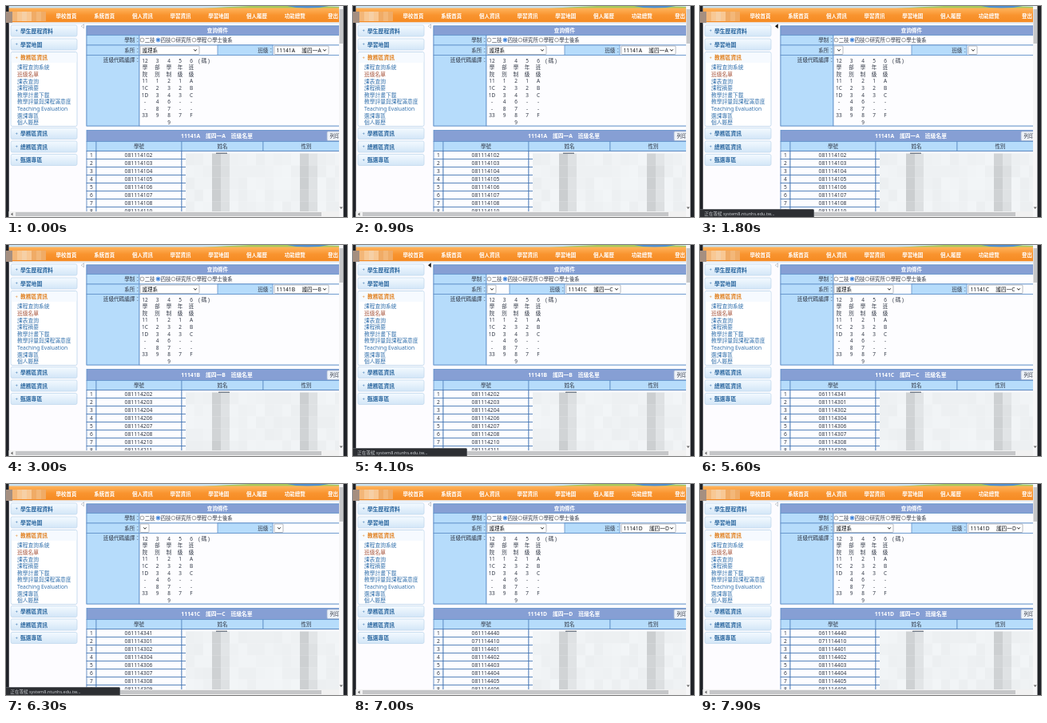
These frames come from a looping animation (427 px wide and 264 px high, 8 s). An HTML page:

```html
<!DOCTYPE html>
<html>
<head>
<meta charset="utf-8">
<title>班級名單</title>
<style>
html, body { margin: 0; width: 100%; height: 100%; overflow: hidden; background: #1f2227; }
svg { display: block; width: 427px; height: 264px; }
text { font-family: "Noto Sans", "Noto Sans CJK TC", "Noto Sans CJK", sans-serif; white-space: pre; }
</style>
</head>
<body>
<svg id="stage" viewBox="0 0 427 264">
  <defs>
    <linearGradient id="nav" x2="0" y2="1">
      <stop offset="0" stop-color="#ffb45c"/><stop offset=".5" stop-color="#f9942f"/><stop offset="1" stop-color="#f58a22"/>
    </linearGradient>
    <linearGradient id="menu" x2="0" y2="1">
      <stop offset="0" stop-color="#f4faff"/><stop offset="1" stop-color="#d3e6f7"/>
    </linearGradient>
    <clipPath id="page"><rect x="3.5" width="413.5" height="264"/></clipPath>
  </defs>
</svg>
<script>
const stage = document.getElementById('stage');
const NS = 'http://www.w3.org/2000/svg';
const INK = '#333a48', LINE = '#5f8fc9', BAR = '#869fd4', LABEL = '#b6dcfb', CELL = '#fdfdff';
let layer = stage;

function add(tag, attrs, content) {
  const el = document.createElementNS(NS, tag);
  for (const k in attrs) el.setAttribute(k, attrs[k]);
  if (content !== undefined) el.textContent = content;
  layer.appendChild(el);
  return el;
}
function group(parent = stage, attrs = {}) {
  layer = parent;
  return layer = add('g', attrs);
}
function box(x, y, w, h, fill, stroke, rx = 0) {
  return add('rect', { x, y, width: w, height: h, fill, stroke: stroke || 'none', 'stroke-width': .8, rx });
}
// y is the middle of the line
function label(s, x, y, o = {}) {
  const size = o.size || 6.6;
  return add('text', {
    x, y: y + size * .36, 'font-size': size, fill: o.fill || INK,
    'text-anchor': o.anchor || 'start', 'font-weight': o.bold ? 700 : 400
  }, s);
}
const mid = (s, x, y, o) => label(s, x, y, { anchor: 'middle', ...o });

function drawTop() {
  box(3.5, 0, 413.5, 264, '#fdfcff');
  box(3.5, 0, 413.5, 3, '#c9e2f2');
  add('path', { d: 'M245 3Q330 -3 417 1V3Z', fill: '#a9c95a' });
  add('path', { d: 'M352 0Q377 6 404 0Z', fill: '#4f8fd0' });
  box(3.5, 2.5, 413.5, 18, 'url(#nav)');
  box(3.5, 20.5, 413.5, 2, '#e4eef8');
  ['學校首頁', '系統首頁', '個人資訊', '學習資訊', '學習地圖', '個人履歷', '功能總覽', '登出']
    .forEach((s, i) => label(s, i < 7 ? 62.5 + i * 47.7 : 403, 13, { fill: '#fff', bold: true, size: 6.5 }));
}
function drawNameTiles() {
  const tints = ['#f3b779', '#f8c894', '#f0ab66', '#f6d0a6'];
  for (let i = 0; i < 14; i++)
    box(8 + i % 7 * 6, 7 + (i / 7 | 0) * 6, 6, 6, tints[i * 5 % 7 % 4]);
  box(0, 7, 8, 14, '#a58f80');
}

function menuButton(s, y) {
  box(6, y, 83, 14, 'url(#menu)', '#c3daee', 2);
  label('+', 11.5, y + 7, { fill: '#3a78b4', size: 6 });
  label(s, 18, y + 7.2, { fill: '#28659e', bold: true, size: 6.8 });
}
function drawSidebar() {
  menuButton('學生歷程資料', 24);
  menuButton('學習地圖', 41);
  box(6, 57.5, 83, 93, '#fff', '#b9d3ea', 2);
  box(6.5, 58, 82, 13, '#f6faff', '', 2);
  label('+', 11.5, 65, { fill: '#e58a28', size: 6 });
  label('教務區資訊', 18, 65, { fill: '#e07f1d', bold: true, size: 6.8 });
  ['課程查詢系統', '班級名單', '課表查詢', '課程摘要', '教學計畫下載', '教學評量與課程滿意度',
    'Teaching Evaluation', '選課專區', '個人履歷'].forEach((s, i) =>
    label(s, 14, 77 + i * 8.6, { fill: i === 1 ? '#a8573f' : '#3572ad', size: 6.75 }));
  ['學務區資訊', '總務區資訊', '甄選專區'].forEach((s, i) => menuButton(s, 152.5 + i * 16.5));
}

function drawForm() {
  box(101, 25, 320, 125, CELL, LINE);
  box(101, 25, 320, 11.5, BAR, LINE);
  mid('查詢條件', 265, 31, { bold: true, fill: '#fff' });
  [[36.5, 12.5], [49, 12.5], [61.5, 88.5]].forEach(([y, h]) => {
    box(101, y, 66, h, LABEL, LINE);
    box(167, y, 254, h, CELL, LINE);
  });
  const right = { anchor: 'end' };
  label('學制：', 168, 42.7, right);
  label('系所：', 168, 55.2, right);
  label('班級代碼編譯：', 168, 67.8, right);
  [['二技', 170.5], ['四技', 190.5], ['研究所', 209.5], ['學程', 235.5], ['學士後系', 255]].forEach(([s, x], i) => {
    const on = i === 1;
    add('circle', { cx: x, cy: 42.5, r: 2.4, fill: '#fff', stroke: on ? '#1769d2' : '#777', 'stroke-width': .7 });
    if (on) add('circle', { cx: x, cy: 42.5, r: 1.4, fill: '#1769d2' });
    label(s, x + 3.2, 42.5, { size: 6.4 });
  });
  const cols = [174, 189.5, 204, 218, 232];
  ['12 3 4 5 6', '學 部 學 年 班', '院 別 制 級 級', '11 1 2 1 A', '1C 2 3 2 B', '1D 3 4 3 C',
    '- 4 6 - -', '- 8 7 - -', '33 9 8 7 F'].forEach((row, r) =>
    row.split(' ').forEach((s, c) => mid(s, cols[c], 68.2 + r * 8.6, { size: 6.5 })));
  mid('9', cols[2], 145.4, { size: 6.5 });
  label('( 碼 )', 241, 68.2);
}

function drawTable() {
  box(101, 155.5, 320, 14, BAR, LINE);
  box(402, 157, 22, 11.5, '#eef2f8', '#a9b9d2', 1.5);
  label('列印', 405.5, 163, { size: 6.4 });
  [[101, 12, ''], [113, 107, '學號'], [220, 102, '姓名'], [322, 108, '性別']].forEach(([x, w, s]) => {
    box(x, 169.5, w, 12, LABEL, LINE);
    mid(s, x + w / 2, 176);
  });
  for (let i = 0; i < 8; i++) {
    const y = 181.5 + i * 10;
    [[101, 12], [113, 107], [220, 205]].forEach(([x, w]) => box(x, y, w, 10, CELL, '#4475b4'));
    mid(i + 1, 107, y + 5.2);
  }
}

// Censor tiles: two darker bands over names and genders
function mosaic(seed) {
  for (let c = 0; c < 18; c++) for (let r = 0; r < 5; r++) {
    const n = Math.sin(c * 12.9 + r * 78.2 + seed * 3.7) * 437.5;
    const base = [236, 236, 236, 203, 220][c % 10] || 236;
    const v = base + (n - Math.floor(n)) * 7 | 0;
    box(225 + c * 11, 184.5 + r * 15, 11.2, 15.2, `rgb(${v},${v + 3},${v + 5})`);
  }
  box(263 + seed % 2 * 3, 183.5, 14, 1.5, '#78808b');
}

function makeSelect(x, fullWidth, size) {
  const frame = box(x, 50, fullWidth, 10.5, '#fff', '#a4a9b1', 1);
  const value = label('', x + 2.5, 55.3, { size, fill: '#14171c' });
  const arrow = add('path', { d: 'M-1.8 54.3l1.8 2l1.8 -2', fill: 'none', stroke: '#222', 'stroke-width': 1 });
  return s => {
    const w = s ? fullWidth : 11;
    frame.setAttribute('width', w);
    value.textContent = s;
    arrow.setAttribute('transform', `translate(${x + w - 5} 0)`);
  };
}

const rolls = {
  A: ['081114102', '081114103', '081114104', '081114105', '081114106', '081114107', '081114108', '081114110'],
  B: ['081114202', '081114203', '081114204', '081114206', '081114207', '081114208', '081114210', '081114211'],
  C: ['061114341', '081114301', '081114302', '081114304', '081114306', '081114307', '081114308', '081114309'],
  D: ['061114440', '071114410', '081114401', '081114402', '081114403', '081114404', '081114405', '081114406']
};

const page = group(stage, { 'clip-path': 'url(#page)' });
drawTop();
drawSidebar();
drawForm();
drawTable();
const setDept = makeSelect(168, 74, 6.5);
const fold = add('path', { d: 'M97.5 22.8v5l-3.2 -2.5z', 'stroke-width': .5 });
const title = mid('', 264, 163, { bold: true, size: 6.8, fill: '#fff' });
const ids = rolls.A.map((s, i) => mid('', 166, 186.7 + i * 10, { size: 6.8 }));

const classField = group(page);
box(265, 49, 69, 12.5, LABEL, LINE);
label('班級：', 335, 55.2, { anchor: 'end' });
const setClass = makeSelect(336, 68, 6.7);

const tiles = {};
Object.keys(rolls).forEach((k, i) => {
  tiles[k] = group(page);
  mosaic(i);
});

group();
box(3.5, 257, 413.5, 7, '#f1f1f1');
box(12, 258, 383, 5, '#c5c6c8');
add('path', { d: 'M8.5 258.5v4l-2.5 -2z', fill: '#666' });
box(417, 0, 5.5, 264, '#f6f6f7');
box(417.5, 4, 4.5, 43, '#c5c6c8');
add('path', { d: 'M417.7 251.5h4l-2 2.5z', fill: '#666' });
drawNameTiles();

const status = group();
box(-1, 254.5, 143.5, 11, '#2d2f33', '#55585d', 1);
label('正在等候 system8.ntunhs.edu.tw...', 5.5, 260, { fill: '#c9ccd0', size: 5.5 });

// start ms, class listed, class chosen, state
const steps = [
  [0, 'A', 'A', 'ready'],
  [1400, 'A', 'B', 'sent'],
  [1700, 'A', '', 'wait'],
  [2400, 'B', 'B', 'ready'],
  [3700, 'B', 'C', 'sent'],
  [4200, 'B', '', 'wait'],
  [4600, 'C', 'C', 'ready'],
  [5900, 'C', 'D', 'sent'],
  [6200, 'C', '', 'wait'],
  [7000, 'D', 'D', 'ready']
];
const LOOP = 8000;
let shown;

function show([, listed, chosen, state]) {
  const ready = state === 'ready';
  setDept(ready ? '護理系' : '');
  setClass(chosen && `11141${chosen}　 護四一${chosen}`);
  // the class field slides left while the department list is empty
  classField.setAttribute('transform', `translate(${state === 'sent' ? -69 : 0} 0)`);
  title.textContent = `11141${listed}　護四一${listed}　班級名單`;
  ids.forEach((el, i) => el.textContent = rolls[listed][i]);
  for (const k in tiles) tiles[k].setAttribute('visibility', k === listed ? 'visible' : 'hidden');
  status.setAttribute('visibility', ready ? 'hidden' : 'visible');
  const pressed = !ready && listed !== 'C';
  fold.setAttribute('fill', pressed ? '#111' : '#fff');
  fold.setAttribute('stroke', pressed ? '#111' : '#8a96a5');
}

const begin = performance.now();
function tick() {
  const t = (performance.now() - begin) % LOOP;
  const step = steps.filter(s => s[0] <= t).pop();
  if (step !== shown) show(shown = step);
  requestAnimationFrame(tick);
}
tick();
</script>
</body>
</html>
```
